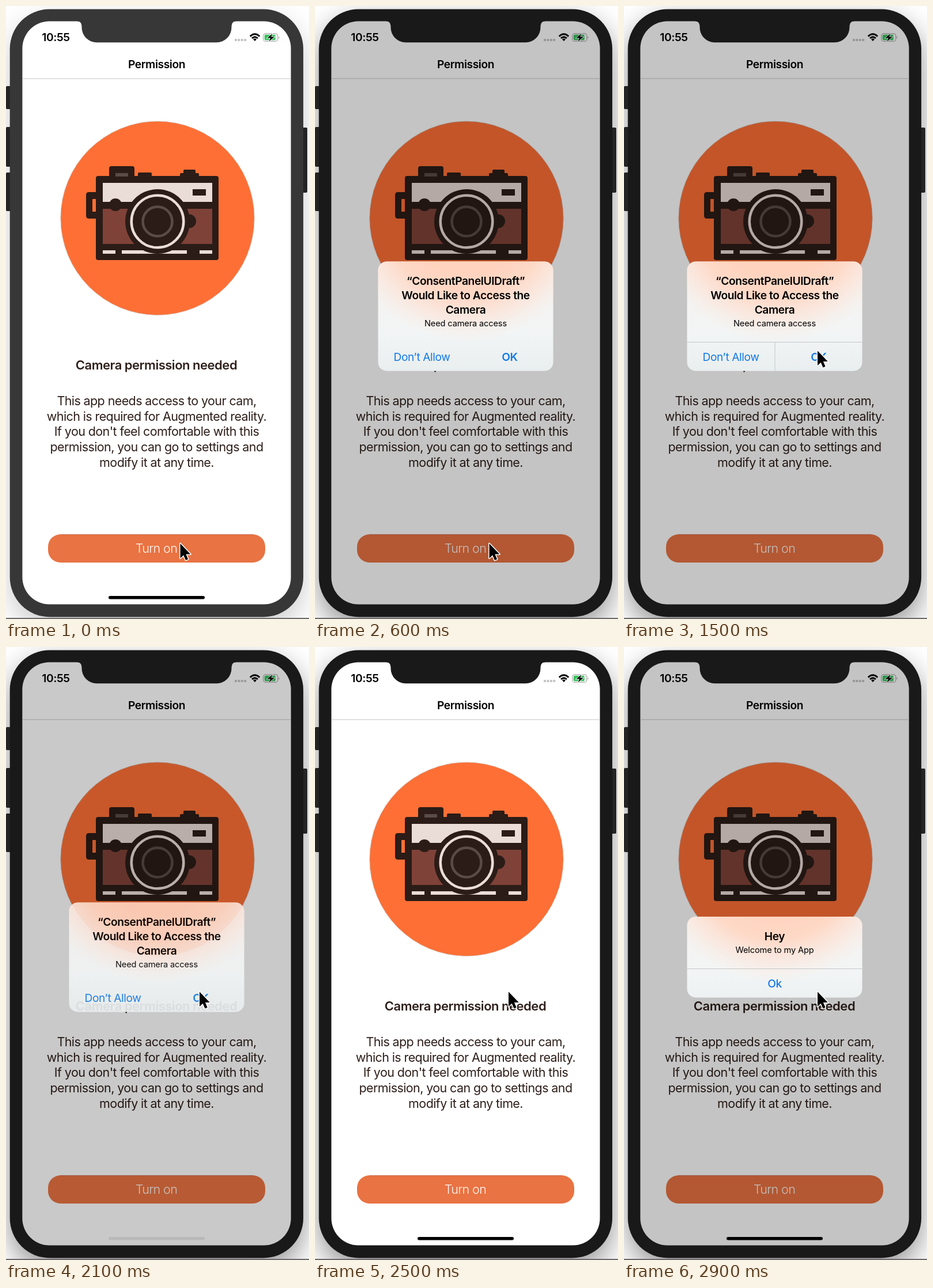
Write an HTML page that moves like this. It is 526x1064 px and loops after 3 s.

```html
<!DOCTYPE html>
<html lang="en">
<head>
<meta charset="utf-8">
<title>Permission</title>
<style>
html, body { margin: 0; width: 100%; height: 100%; overflow: hidden; background: #fff; }
svg { display: block; width: 526px; height: 1064px; }
text { font-family: Inter, Roboto, sans-serif; text-anchor: middle; letter-spacing: -0.022em; }
.semi { font-weight: 600; }
.nav { font-size: 19.2px; }
.head { font-size: 22px; }
.body { font-size: 21.5px; letter-spacing: -0.028em; }
.head, .body { fill: #2e1f1a; }
.small { font-size: 14.6px; letter-spacing: -0.01em; }
.blue { fill: #1279e6; font-size: 19.2px; }
#label { font-size: 21.5px; letter-spacing: -0.028em; font-weight: 300; fill: #fff; }
.dark { fill: #2b1c17; }
.cream { fill: #eadcd6; }
.grey { fill: #5a4b46; }
.line { stroke: #c3c7c8; }
</style>
</head>
<body>
<svg viewBox="0 0 526 1064" xmlns="http://www.w3.org/2000/svg">
  <defs>
    <filter id="blur" x="-30%" y="-30%" width="160%" height="160%"><feGaussianBlur stdDeviation="24"/></filter>
    <clipPath id="screen"><rect x="28.4" y="26.4" width="466.2" height="1012.2" rx="47"/></clipPath>
    <linearGradient id="glass" gradientUnits="userSpaceOnUse" x1="0" y1="440" x2="0" y2="635">
      <stop offset="0" stop-color="#f6f0ec"/><stop offset=".65" stop-color="#f2f5f5"/><stop offset="1" stop-color="#e9eeee"/>
    </linearGradient>
    <radialGradient id="glow" gradientUnits="userSpaceOnUse" cx="263" cy="368" r="215">
      <stop offset=".45" stop-color="#ffd3be"/><stop offset=".65" stop-color="#ffd6c2" stop-opacity=".9"/>
      <stop offset=".82" stop-color="#ffdecf" stop-opacity=".5"/><stop offset="1" stop-color="#ffe8dc" stop-opacity="0"/>
    </radialGradient>
  </defs>

  <rect width="526" height="1064" fill="#fff"/>
  <rect id="shadow" x="7" y="24" width="509" height="1056" rx="70" filter="url(#blur)"/>
  <g fill="#242424">
    <rect x="0" y="139" width="9" height="40" rx="2"/>
    <rect x="0" y="210" width="9" height="69" rx="2"/>
    <rect x="0" y="289" width="9" height="67" rx="2"/>
    <rect x="514" y="211" width="9" height="113" rx="2"/>
  </g>
  <rect y="1062" width="526" height="2" fill="#6a6a6a"/>
  <rect class="bezel" x="6.7" y="5.4" width="509.400" height="1055" rx="69"/>

  <g clip-path="url(#screen)">
    <rect x="28" y="26" width="467" height="1013" fill="#fff"/>
    <text class="semi nav" x="86.5" y="61">10:55</text>
    <g fill="#c4c4c4">
      <rect x="397" y="57" width="4" height="4" rx="1"/><rect x="402.4" y="57" width="4" height="4" rx="1"/>
      <rect x="407.8" y="57" width="4" height="4" rx="1"/><rect x="413.2" y="57" width="4" height="4" rx="1"/>
    </g>
    <path d="M423.8 52.7Q432 44.8 440.2 52.7M427 56Q432 51.4 437 56" fill="none" stroke="#000" stroke-width="2.9"/>
    <path d="M429 57.8Q432 55.4 435 57.8L432 61Z"/>
    <rect x="446.8" y="47.8" width="25" height="13.4" rx="3.8" fill="none" stroke="#a8a8a8" stroke-width="1.2"/>
    <rect x="448.8" y="49.8" width="19" height="9.4" rx="2" fill="#33c35a"/>
    <path d="M473.4 52.2Q476 54.5 473.4 56.8Z" fill="#a8a8a8"/>
    <path d="M462.5 48L453.5 55.6H459L456.5 61.5L466 53.6H460.4Z" stroke="#fff" stroke-width="1.6" paint-order="stroke"/>
    <text class="semi nav" x="261.5" y="108">Permission</text>
    <path d="M28 126H495" stroke="#c4c4c4"/>

    <circle cx="263" cy="368.3" r="168.2" fill="#fd6f35" stroke="#cfc3bd" stroke-width=".8"/>
    <g class="dark">
      <path fill-rule="evenodd" d="M144 323H158V369H144Q139 369 139 364V328Q139 323 144 323ZM150 335V357H157V335Z"/>
      <rect x="179" y="278" width="44" height="24" rx="4"/>
      <rect x="229" y="289" width="24" height="10" rx="2"/>
      <rect x="302" y="290" width="33" height="10" rx="2"/>
      <rect x="308" y="284" width="21" height="10" rx="2"/>
      <rect x="156" y="295" width="213" height="146" rx="4"/>
    </g>
    <rect class="grey" x="190" y="290" width="22" height="6"/>
    <rect class="cream" x="168" y="307" width="190" height="33"/>
    <rect x="168" y="352" width="190" height="61" fill="#7f4238"/>
    <g class="cream">
      <rect x="168" y="424" width="22" height="6"/><rect x="201" y="424" width="113" height="6"/><rect x="336" y="424" width="22" height="6"/>
    </g>
    <g class="dark">
      <rect x="324" y="318" width="23" height="11"/>
      <circle cx="190" cy="345" r="11"/><circle cx="318" cy="373.5" r="12"/>
      <circle cx="263" cy="374" r="56"/>
    </g>
    <g fill="none" stroke-width="4.5">
      <circle cx="263" cy="374" r="45.3" stroke="#eadcd6"/><circle cx="263" cy="374" r="25.5" stroke="#5a4b46"/>
    </g>

    <text class="semi head" x="261" y="631">Camera permission needed</text>
    <g id="copy"></g>
    <rect x="73" y="917" width="377" height="49" rx="21.5" fill="#e97342"/>
    <path d="M94 917.3H429" stroke="#b9695a" stroke-width=".7"/>
    <text id="label" x="261" y="949">Turn on</text>
    <rect id="dim" x="28" y="26" width="467" height="1013"/>
    <rect id="home" x="178" y="1024" width="167" height="5.4" rx="2.7"/>
  </g>
  <path class="bezel" d="M124 25V26.400Q131 26.400 131.500 35V37A26 26 0 0 0 157.500 63.300H365.500A26 26 0 0 0 391.500 37V35Q392 26.400 399 26.400V25Z"/>

  <g id="ask">
    <rect x="109.5" y="443.5" width="304" height="190" rx="15" fill="url(#glass)"/>
    <rect x="109.5" y="443.5" width="304" height="190" rx="15" fill="url(#glow)"/>
    <g class="semi nav">
      <text x="261.5" y="484">“ConsentPanelUIDraft”</text>
      <text x="261.5" y="509">Would Like to Access the</text>
      <text x="261.5" y="534">Camera</text>
    </g>
    <text class="small" x="261.5" y="556">Need camera access</text>
    <path id="askLines" class="line" d="M109.5 583.5H413.5M262 583.5V633.5"/>
    <text class="blue" x="185.5" y="615.5">Don’t Allow</text>
    <text class="blue semi" x="338" y="615.5">OK</text>
  </g>
  <g id="hey">
    <rect x="109.5" y="468" width="304" height="140.5" rx="15" fill="url(#glass)"/>
    <rect x="109.5" y="468" width="304" height="140.5" rx="15" fill="url(#glow)"/>
    <text class="semi nav" x="261.5" y="509">Hey</text>
    <text class="small" x="261.5" y="531">Welcome to my App</text>
    <path id="heyLines" class="line" d="M109.5 558.5H413.5"/>
    <text class="blue" x="261.5" y="590.5" font-weight="500">Ok</text>
  </g>
  <path id="cursor" d="M0 0V25.5L5.7 20.2L9.5 29L13.6 27.2L9.9 18.6H17.8Z" stroke="#fff" stroke-width="3" paint-order="stroke" stroke-linejoin="round"/>
</svg>
<script>
const LOOP = 3000, STEP = 100;
const COPY = [
  'This app needs access to your cam,',
  'which is required for Augmented reality.',
  "If you don't feel comfortable with this",
  'permission, you can go to settings and',
  'modify it at any time.'
];
const $ = id => document.getElementById(id);
const set = (id, name, value) => $(id).setAttribute(name, value);
const clamp = v => Math.max(0, Math.min(1, v));
const ease = v => v < .5 ? 4 * v ** 3 : 1 - (2 - 2 * v) ** 3 / 2;
const span = (t, from, to) => ease(clamp((t - from) / (to - from)));
const bezels = document.querySelectorAll('.bezel');

$('copy').innerHTML = COPY.map((line, i) =>
  `<text class="body" x="261.5" y="${692.7 + i * 26.8}">${line}</text>`).join('');

function draw(t) {
  const active = t >= 100;
  bezels.forEach(b => b.setAttribute('fill', active ? '#191919' : '#373737'));
  set('shadow', 'opacity', active ? .42 : .2);
  set('label', 'opacity', t >= 400 && t < 600 ? .22 : .95);

  const ask = t < 600 ? 0 : 1 - span(t, 2070, 2180);
  const hey = t < 2700 ? 0 : 1;
  set('ask', 'opacity', ask);
  set('hey', 'opacity', hey);
  set('dim', 'opacity', .231 * Math.max(ask, hey));
  set('home', 'opacity', 1 - ask);
  set('askLines', 'opacity', t >= 700 && t < 2100 ? 1 : 0);
  set('heyLines', 'opacity', t >= 2800 ? 1 : 0);

  const move = span(t, 1100, 1500);
  set('cursor', 'transform', `translate(${302.5 + 33.5 * move} ${933 - 334.5 * move})`);
}

function frame(now) {
  draw(Math.floor((now % LOOP) / STEP) * STEP);
  requestAnimationFrame(frame);
}
draw(0);
requestAnimationFrame(frame);
</script>
</body>
</html>
```
